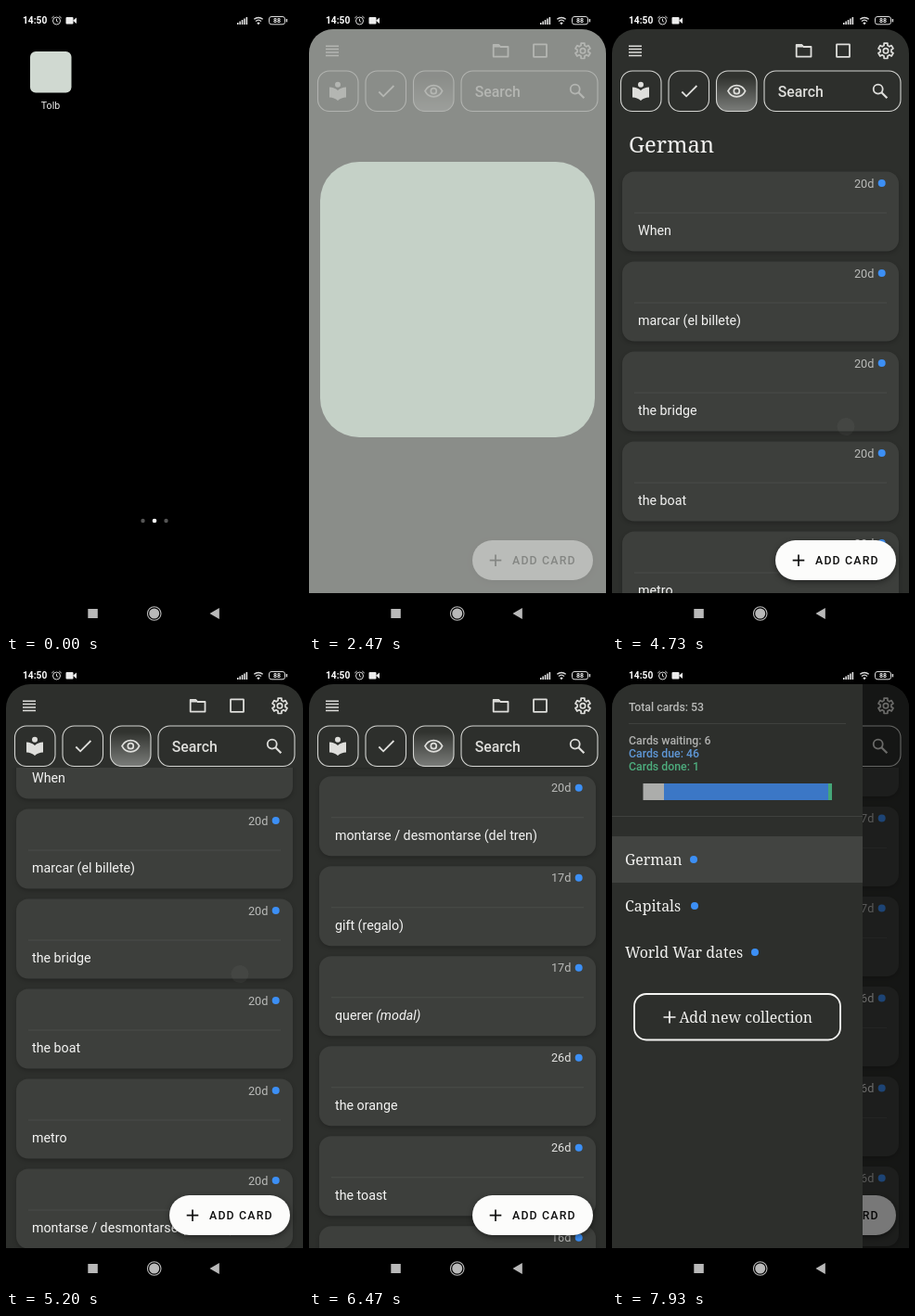
These frames come from a looping animation (320x676 px, 8 s). An HTML page:

```html
<!DOCTYPE html>
<html lang="en">
<head>
<meta charset="utf-8">
<title>Flashcards</title>
<style>
  html, body { margin: 0; width: 100%; height: 100%; overflow: hidden; background: #000; }
  svg { display: block; width: 100%; height: 100%; }
  text { font-family: Roboto, "Liberation Sans", sans-serif; white-space: pre; }
  .slab { font-family: "Noto Serif", "Liberation Serif", serif; fill: #f2f2f0; }
  .med { font-weight: 500; }
  .line { fill: none; stroke: #dededb; }
  .solid { fill: #dededb; }
  .box { fill: none; stroke: #d4d5d2; stroke-width: 1.1; }
  .card { fill: #3d3f3c; filter: drop-shadow(0 2px 2px rgba(0, 0, 0, .22)); }
  .blue { fill: #3c8ff5; }
  #fab rect { filter: drop-shadow(0 2px 3px rgba(0, 0, 0, .45)); }
</style>
</head>
<body>
<svg viewBox="0 0 320 676">
  <defs>
    <clipPath id="screen"><path d="M0 633V51A26 26 0 0 1 26 25H294A26 26 0 0 1 320 51V633Z"/></clipPath>
    <clipPath id="view"><rect y="115" width="320" height="518"/></clipPath>
    <linearGradient id="glow" x2="0" y2="1">
      <stop offset=".15" stop-color="#31332f"/><stop offset="1" stop-color="#7b7d7a"/>
    </linearGradient>
  </defs>
  <rect width="320" height="676"/>

  <g id="home">
    <rect id="icon" x="26" y="49" width="44.5" height="44.5" rx="6" fill="#d0d9d1"/>
    <text id="label" x="48" y="111" font-size="10.6" text-anchor="middle" fill="#eee">Tolb</text>
    <circle cx="147.5" cy="555" r="2.2" fill="#555"/>
    <circle cx="160" cy="555" r="2.3" fill="#fff"/>
    <circle cx="172.5" cy="555" r="2.2" fill="#555"/>
  </g>

  <g clip-path="url(#screen)">
    <g id="app">
      <rect y="25" width="320" height="608" fill="#2d2f2c"/>
      <g clip-path="url(#view)">
        <g id="list"><text class="slab" x="18" y="158" font-size="23.8">German</text></g>
        <circle id="touch" cx="252" r="9.5" fill="#fff" opacity=".04"/>
      </g>

      <path class="line" stroke-width="1.5" d="M18 43.2h14M18 46.6h14M18 50h14M18 53.4h14"/>
      <path class="line" stroke-width="1.8" stroke-linejoin="round" d="M198.7 41.8h5.6l2 2.2h8.2v10.6h-15.8z"/>
      <path class="line" stroke-width="2.2" d="M198.5 43.3h7"/>
      <rect class="line" stroke-width="1.8" x="242" y="41.3" width="14" height="13.6" rx=".5"/>
      <path id="gear" class="line" stroke-width="1.7" stroke-linejoin="round"/>
      <circle class="line" stroke-width="1.7" cx="295" cy="48.3" r="2.7"/>

      <rect class="box" x="9.5" y="70" width="43.5" height="43.5" rx="12.5"/>
      <rect class="box" x="61" y="70" width="43.5" height="43.5" rx="12.5"/>
      <rect class="box" x="112.5" y="70" width="43.5" height="43.5" rx="12.5" style="fill:url(#glow)"/>
      <rect class="box" x="164" y="70" width="147" height="43.5" rx="12.5"/>
      <path class="solid" transform="translate(19 79.5)" d="M12 11.5C9.6 9.3 6.5 8 3 8v11c3.5 0 6.6 1.3 9 3.5 2.4-2.2 5.5-3.5 9-3.5V8c-3.5 0-6.6 1.3-9 3.5z"/>
      <circle class="solid" cx="31" cy="84.7" r="3"/>
      <path class="line" stroke-width="1.8" d="M75.3 92.5l4.8 4.8 11.3-11.3"/>
      <path class="line" stroke-width="1.7" d="M125 91.7C126.9 87.7 130.3 85.6 134.3 85.6S141.7 87.7 143.6 91.7C141.7 95.7 138.3 97.8 134.3 97.8S126.9 95.7 125 91.7Z"/>
      <circle class="line" stroke-width="1.7" cx="134.3" cy="91.7" r="3"/>
      <text class="solid med" x="178.7" y="97.6" font-size="15.8">Search</text>
      <circle class="line" stroke-width="1.8" cx="286.7" cy="89.6" r="5"/>
      <path class="line" stroke-width="2.2" d="M290.4 93.3l6 6"/>

      <g id="fab">
        <rect x="176" y="576" width="130" height="43" rx="21.5" fill="#fcfcfb"/>
        <path d="M201 591.5v12.5M194.7 597.7h12.6" stroke="#111" stroke-width="1.7"/>
        <text class="med" x="219" y="602.2" font-size="12.3" letter-spacing="1.2" fill="#111">ADD CARD</text>
      </g>

      <rect id="scrim" y="25" width="320" height="608"/>
      <g id="drawer">
        <rect y="25" width="270" height="608" fill="#2d2f2c"/>
        <g id="stats" class="med" font-size="12.3"></g>
        <path d="M18 67.5h234M0 167.5h270" stroke="#3f413e"/>
        <rect x="33.5" y="132" width="23" height="18" fill="#acadab"/>
        <rect x="56" y="132" width="177" height="18" fill="#3b77c6"/>
        <rect x="233" y="132" width="4" height="18" fill="#45a678"/>
        <rect y="189" width="270" height="50" fill="#424441"/>
        <g id="rows"></g>
        <rect x="24" y="359" width="222" height="49.5" rx="13" fill="none" stroke="#f4f4f2" stroke-width="1.8"/>
        <path d="M62 377.5v13M55.5 384h13" stroke="#f4f4f2" stroke-width="1.7"/>
        <text class="slab" x="72.5" y="389.5" font-size="15.8">Add new collection</text>
      </g>
    </g>

    <g id="splash">
      <rect id="veil" width="320" height="633" fill="#a7aaa6"/>
      <rect id="mark" x="12" y="168" width="296" height="297" rx="42" fill="#cad7cd"/>
    </g>
  </g>

  <g id="status" fill="#ececec">
    <text x="18" y="19" font-size="10.2" font-weight="700" fill="#fff">14:50</text>
    <g fill="none" stroke="#ddd">
      <circle cx="54.5" cy="16" r="4"/>
      <path d="M54.5 13.7v2.6l1.7 1M49.3 13l2.4-2M59.7 13l-2.4-2"/>
      <path d="M267.3 14.3a7 7 0 0 1 9.4 0M269 16.5a4.5 4.5 0 0 1 6 0" stroke-width="1.3"/>
      <rect x="283.5" y="11.5" width="17" height="8.3" rx="2.5"/>
    </g>
    <rect x="64.5" y="12" width="8" height="7.5" rx="1"/>
    <path d="M72 15.7l4-3.2v6.5z"/>
    <path d="M270.3 18.2a2.5 2.5 0 0 1 3.4 0l-1.7 2z"/>
    <rect x="301.8" y="14" width="1.3" height="3.3"/>
    <text x="292" y="18.2" font-size="7" font-weight="700" text-anchor="middle">88</text>
  </g>
  <g fill="#b9b9b9">
    <rect x="88.3" y="650" width="10.5" height="10"/>
    <circle cx="159.7" cy="655" r="5.5"/>
    <circle cx="159.7" cy="655" r="7.3" fill="none" stroke="#b9b9b9" stroke-width="1.1"/>
    <path d="M219.5 655l10.3-6v12z"/>
  </g>
</svg>
<script>
const LOOP = 8000;
const $ = id => document.getElementById(id);
const add = (id, markup) => $(id).insertAdjacentHTML('beforeend', markup);

const cards = [
  ['When', '20d'], ['marcar (el billete)', '20d'], ['the bridge', '20d'],
  ['the boat', '20d'], ['metro', '20d'], ['montarse / desmontarse (del tren)', '20d'],
  ['gift (regalo)', '17d'],
  ['querer <tspan font-style="italic">(modal)</tspan>', '17d'],
  ['the orange', '26d'], ['the toast', '26d'], ['the bread', '16d']
];
cards.forEach(([word, due], i) => add('list', `<g transform="translate(0 ${179 + 97 * i})">
  <rect class="card" x="11" width="298" height="86" rx="13"/>
  <path d="M24 44.5h272" stroke="#4a4c49"/>
  <text x="282.3" y="17" font-size="12.7" text-anchor="end" fill="${due === '26d' ? '#e2e2e0' : '#b9bab8'}">${due}</text>
  <circle class="blue due" cx="290.7" cy="12.4" r="4"/>
  <text x="28" y="68.5" font-size="14.25" fill="#f4f4f3">${word}</text></g>`));
const dueDots = document.querySelectorAll('.due');

[['Total cards: 53', 53.7, '#b9bab8'], ['Cards waiting: 6', 89.5, '#b0b1af'],
 ['Cards due: 46', 103.5, '#5f97d6'], ['Cards done: 1', 117.7, '#4dac7d']]
  .forEach(([s, y, c]) => add('stats', `<text x="18" y="${y}" fill="${c}">${s}</text>`));

[['German', 88], ['Capitals', 89], ['World War dates', 154]].forEach(([s, x], i) => {
  const y = 214 + 50 * i;
  add('rows', `<text class="slab" x="14" y="${y + 5.5}" font-size="15.9">${s}</text>
    <circle class="blue" cx="${x}" cy="${y}" r="4"/>`);
});

for (let i = 0; i < 5; i++) {
  const h = 2 + 1.5 * i;
  add('status', `<rect x="${249 + 2.4 * i}" y="${20 - h}" width="1.5" height="${h}"/>`);
}

// Six teeth, four corner points each.
const teeth = [];
for (let i = 0; i < 6; i++) {
  for (const [da, r] of [[-19, 6], [-13, 8.4], [13, 8.4], [19, 6]]) {
    const a = (i * 60 + da - 90) * Math.PI / 180;
    teeth.push((295 + r * Math.cos(a)).toFixed(2) + ' ' + (48.3 + r * Math.sin(a)).toFixed(2));
  }
}
$('gear').setAttribute('d', 'M' + teeth.join('L') + 'Z');

const clamp = v => Math.min(1, Math.max(0, v));
const part = (t, a, b) => clamp((t - a) / (b - a));

// Linear value through [time, value] steps.
function track(t, steps) {
  if (t <= steps[0][0]) return steps[0][1];
  for (let i = 1; i < steps.length; i++) {
    const [a, v] = steps[i - 1], [b, w] = steps[i];
    if (t < b) return v + (w - v) * (t - a) / (b - a);
  }
  return steps[steps.length - 1][1];
}

// Drag speeds up, then the fling slows to rest.
function scrollAt(t) {
  if (t < 4700) return 0;
  if (t < 5340) return 116 * ((t - 4700) / 500) ** 2;
  return 604 - 414 * (1 - part(t, 5340, 7150)) ** 1.9;
}

const show = (id, on) => { $(id).style.display = on ? '' : 'none'; };
const fade = (id, v) => $(id).setAttribute('opacity', v);
const move = (id, s) => $(id).setAttribute('transform', s);

function render(t) {
  const launching = t >= 1380;

  const size = track(t, [[1380, 1], [1800, .895], [2020, .87]]);
  show('home', t < 2025);
  show('icon', !launching);
  fade('icon', track(t, [[530, 1], [730, .82], [1000, .82], [1200, 1]]));
  fade('label', 1 - part(t, 1380, 1500));
  fade('home', track(t, [[1380, 1], [1800, .7], [2020, .6]]));
  move('home', `translate(160 338) scale(${size}) translate(-160 -338)`);

  const k = .5 - .5 * Math.cos(Math.PI * part(t, 1380, 2025));
  show('splash', launching && t < 2960);
  move('splash', `translate(${26 * (1 - k)} ${49 * (1 - k)}) scale(${(45 + 275 * k) / 320} ${(45 + 588 * k) / 633})`);
  fade('splash', track(t, [[1380, 1], [1650, .62], [1800, .62], [2025, 1]]));
  fade('veil', track(t, [[1380, 0], [1650, 1], [2240, 1], [2470, .77], [2930, 0]]));
  fade('mark', 1 - part(t, 2430, 2930));

  show('app', t >= 2025);
  fade('list', part(t, 2500, 2800));
  const y = scrollAt(t);
  move('list', `translate(0 ${-y})`);
  dueDots.forEach(d => { d.style.display = t >= 3330 ? '' : 'none'; });
  show('touch', t >= 4700 && t < 5340);
  $('touch').setAttribute('cy', 454 - y);

  const open = 1 - (1 - part(t, 7310, 7900)) ** 2.5;
  show('drawer', open > 0);
  move('drawer', `translate(${-270 * (1 - open)} 0)`);
  fade('scrim', .52 * open);
}

const start = performance.now();
function tick() {
  render((performance.now() - start) % LOOP);
  requestAnimationFrame(tick);
}
tick();
</script>
</body>
</html>
```
